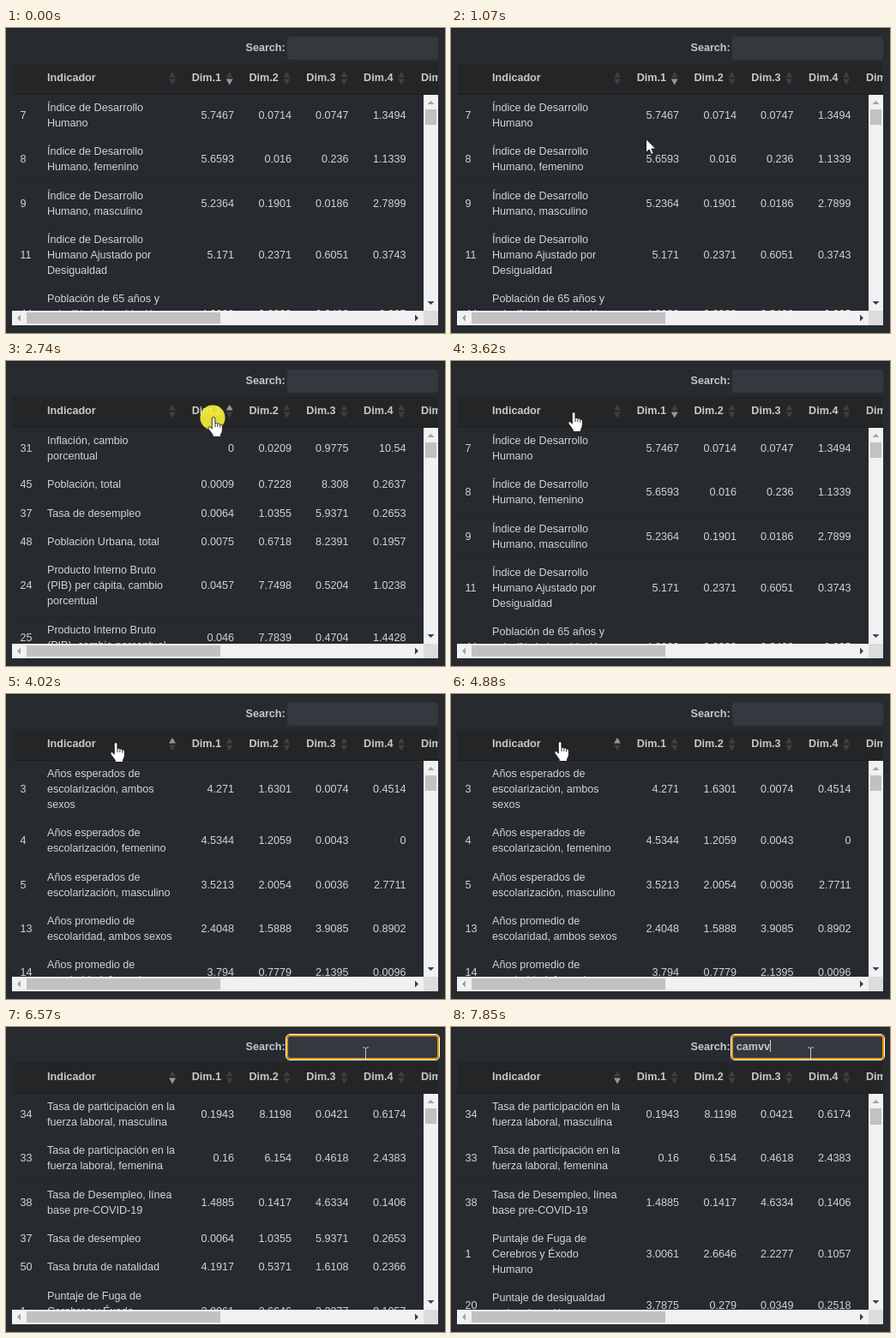
These frames come from a looping animation (512 by 356 pixels, 8 s). An HTML page:

```html
<!DOCTYPE html>
<html lang="es">
<head>
<meta charset="utf-8">
<title>Tabla de indicadores</title>
<style>
  html, body { margin: 0; width: 100%; height: 100%; overflow: hidden; background: #272b30; }
  svg { display: block; width: 512px; height: 356px; }
  text { font: 12.6px "Liberation Sans", Arial, sans-serif; fill: #d2d4d5; white-space: pre; }
  .bold { font-weight: bold; fill: #c8c8c8; }
</style>
</head>
<body>
<svg id="stage" viewBox="0 0 512 356" xmlns="http://www.w3.org/2000/svg">
  <defs>
    <clipPath id="bodyClip"><rect x="7" y="78" width="480" height="252"/></clipPath>
    <clipPath id="headClip"><rect x="7" y="41" width="497" height="37"/></clipPath>
  </defs>
  <rect width="512" height="356" fill="#272b30"/>
  <rect width="512" height="1" fill="#1f2226"/>

  <text class="bold" x="279.5" y="27">Search:</text>
  <rect x="328" y="10" width="176" height="27" rx="4" fill="#34393f"/>
  <g id="focus" fill="none">
    <rect x="326.5" y="8.5" width="179" height="30" rx="4.5" stroke="#fff"/>
    <rect x="328" y="10" width="176" height="27" rx="3.5" stroke="#e59700" stroke-width="2"/>
  </g>
  <text id="query" class="bold" x="332.7" y="27"></text>
  <rect id="caret" width="1" height="14" fill="#d8d8d8"/>

  <g clip-path="url(#headClip)">
    <rect x="7" y="41" width="497" height="37" fill="#242526"/>
    <rect x="7" y="77" width="497" height="1" fill="#1c1e20"/>
    <g id="head"></g>
  </g>
  <g id="body" clip-path="url(#bodyClip)"></g>

  <rect x="487" y="78" width="17" height="252" fill="#f1f1f1"/>
  <rect x="7" y="330" width="480" height="17" fill="#f1f1f1"/>
  <rect x="487" y="330" width="17" height="17" fill="#dcdcdc"/>
  <rect id="thumb" x="489" y="95" width="13" height="18" fill="#c1c1c1"/>
  <rect x="24" y="332" width="226" height="13" fill="#c1c1c1"/>
  <path d="M491.5 89h8l-4-4zM17 334.5v8l-4-4z" fill="#a3a3a3"/>
  <path d="M491.5 319h8l-4 4zM477 334.5v8l4-4z" fill="#34424f"/>

  <circle id="press" r="14.6" fill="#f8f23a" opacity=".9"/>
  <path id="arrow" d="M.5 .5V16.5L4.2 13L6.7 18.5L9.2 17.4L6.8 12H11.8Z"
    fill="#fff" stroke="#111" stroke-width=".9"/>
  <g id="hand">
    <path transform="translate(0 -.8) scale(1.08)" d="M-.7 13V2Q-.7 .4 1 .4T2.7 2V7Q4 6.1 5.3 7.4Q6.8 6.7 8 8.2Q10.5 7.8 10.5 10.2V14
      Q10.5 17 8.8 19V21.6H.2V19.5L-4.4 13.2Q-5.3 11.6-4 10.8Q-2.7 10.2-1.7 11.6Z
      M2.8 7V11M5.4 8V11M8 8.5V11.5" fill="#fff" stroke="#111" stroke-width=".8" stroke-linejoin="round"/>
  </g>
  <path id="beam" d="M-1 -6.5H1.5L2.5 -5.5L3.5 -6.5H6M2.5 -6V6.5M-1 7.5H1.5L2.5 6.5L3.5 7.5H6"
    fill="none" stroke="#c4c6c8"/>
</svg>
<script>
const LOOP = 8000, STEP = 67;
const $ = id => document.getElementById(id);
const rightEdges = [266, 333, 399.5, 466.5];

// id, lines of the label, four values
const row = (id, label, values) => ({ id, lines: label.split("|"), values: values.split(" ") });

const jobless = row(37, "Tasa de desempleo", "0.0064 1.0355 5.9371 0.2653");
const brain = row(1, "Puntaje de Fuga de|Cerebros y Éxodo|Humano", "3.0061 2.6646 2.2277 0.1057");
const workRates = [
  row(34, "Tasa de participación en la|fuerza laboral, masculina", "0.1943 8.1198 0.0421 0.6174"),
  row(33, "Tasa de participación en la|fuerza laboral, femenina", "0.16 6.154 0.4618 2.4383"),
  row(38, "Tasa de Desempleo, línea|base pre-COVID-19", "1.4885 0.1417 4.6334 0.1406")
];

const views = {
  dimDown: { col: 1, up: false, rows: [
    row(7, "Índice de Desarrollo|Humano", "5.7467 0.0714 0.0747 1.3494"),
    row(8, "Índice de Desarrollo|Humano, femenino", "5.6593 0.016 0.236 1.1339"),
    row(9, "Índice de Desarrollo|Humano, masculino", "5.2364 0.1901 0.0186 2.7899"),
    row(11, "Índice de Desarrollo|Humano Ajustado por|Desigualdad", "5.171 0.2371 0.6051 0.3743"),
    row(44, "Población de 65 años y|más (% de la población|total)", "4.8889 0.0008 0.2498 0.985")
  ] },
  dimUp: { col: 1, up: true, rows: [
    row(31, "Inflación, cambio|porcentual", "0 0.0209 0.9775 10.54"),
    row(45, "Población, total", "0.0009 0.7228 8.308 0.2637"),
    jobless,
    row(48, "Población Urbana, total", "0.0075 0.6718 8.2391 0.1957"),
    row(24, "Producto Interno Bruto|(PIB) per cápita, cambio|porcentual", "0.0457 7.7498 0.5204 1.0238"),
    row(25, "Producto Interno Bruto|(PIB), cambio porcentual", "0.046 7.7839 0.4704 1.4428")
  ] },
  nameUp: { col: 0, up: true, rows: [
    row(3, "Años esperados de|escolarización, ambos|sexos", "4.271 1.6301 0.0074 0.4514"),
    row(4, "Años esperados de|escolarización, femenino", "4.5344 1.2059 0.0043 0"),
    row(5, "Años esperados de|escolarización, masculino", "3.5213 2.0054 0.0036 2.7711"),
    row(13, "Años promedio de|escolaridad, ambos sexos", "2.4048 1.5888 3.9085 0.8902"),
    row(14, "Años promedio de|escolaridad, femenino", "3.794 0.7779 2.1395 0.0096")
  ] },
  nameDown: { col: 0, up: false, rows: [
    ...workRates,
    jobless,
    row(50, "Tasa bruta de natalidad", "4.1917 0.5371 1.6108 0.2366"),
    brain
  ] },
  filtered: { col: 0, up: false, rows: [
    ...workRates,
    brain,
    row(20, "Puntaje de desigualdad|en la educación", "3.7875 0.279 0.0349 0.2518")
  ] }
};

// Each list holds [start time, value]; the latest started entry applies
const viewTimes = [[0, "dimDown"], [2070, "dimUp"], [2950, "dimDown"], [4020, "nameUp"],
  [4950, "nameDown"], [7260, "filtered"]];
const queryTimes = [[0, ""], [7120, "c"], [7190, "ca"], [7260, "cam"], [7720, "camv"], [7850, "camvv"]];
const presses = [[1870, 2000], [2740, 2880], [3820, 3950], [4620, 4750], [6030, 6170]];

// Pointer moves: start time and the points visited, one per STEP
const moves = [
  [0, [[192, 338]]],
  [730, [[192, 338], [200, 282], [208, 232], [215, 190], [222, 155], [227, 129],
    [231, 112], [234, 98], [237, 86], [239, 76], [240, 70], [241, 66]]],
  [3480, [[222, 65], [178, 62], [142, 60], [130, 58], [127, 57]]],
  [4350, [[126, 56]]],
  [5350, [[138, 55], [178, 52], [228, 48], [290, 42], [345, 36], [395, 32], [417, 30.5]]]
];

const latestEntry = (list, t) => list.filter(e => e[0] <= t).pop();
const latest = (list, t) => latestEntry(list, t)[1];
const within = (t, [from, to]) => t >= from && t < to;
const show = (el, on) => el.setAttribute("visibility", on ? "visible" : "hidden");
const label = (x, y, s, extra = "") => `<text x="${x}" y="${y}" ${extra}>${s}</text>`;

function drawHead({ col, up }) {
  const names = ["Indicador", "Dim.1", "Dim.2", "Dim.3", "Dim.4", "Dim.5"];
  $("head").innerHTML = names.map((name, i) => {
    const x = i ? 216.7 + (i - 1) * 66.8 : 48;
    const mid = i ? 260.7 + (i - 1) * 66.8 : 194;
    const tint = on => i === col && on ? "#94979a" : "#3c4043";
    return label(x, 62, name, 'class="bold"') +
      `<path d="M${mid - 4} 57.5h8l-4 -6.5z" fill="${tint(up)}"/>` +
      `<path d="M${mid - 4} 59.5h8l-4 7z" fill="${tint(!up)}"/>`;
  }).join("");
}

function drawRows({ rows }) {
  let top = 76.2, out = "";
  for (const { id, lines, values } of rows) {
    const height = lines.length * 18 + 15.3;
    const mid = top + height / 2;
    const base = y => Math.round(y + 4.2);
    out += label(16.4, base(mid), id);
    lines.forEach((s, i) => out += label(48, base(mid + 18 * (i - (lines.length - 1) / 2)), s));
    values.forEach((v, i) => out += label(rightEdges[i], base(mid), v, 'text-anchor="end"'));
    top += height;
    out += `<rect x="7" y="${Math.round(top + .9)}" width="480" height="1" fill="#222529"/>`;
  }
  $("body").innerHTML = out;
}

function pointerAt(t) {
  const [start, points] = latestEntry(moves, t);
  const i = Math.floor((t - start + 5) / STEP);
  return points[Math.min(i, points.length - 1)];
}

function drawPointer(t) {
  const [x, y] = pointerAt(t);
  const inHead = y >= 41 && y < 78;
  const inBox = x >= 328 && x < 504 && y >= 10 && y < 37;
  const kind = inHead ? "hand" : inBox ? "beam" : "arrow";
  for (const id of ["arrow", "hand", "beam"]) {
    show($(id), t >= 730 && id === kind);
    $(id).setAttribute("transform", `translate(${x} ${y})`);
  }
  $("press").setAttribute("cx", x);
  $("press").setAttribute("cy", y);
  show($("press"), presses.some(p => within(t, p)));
}

let shown = "";
function render(t) {
  const name = latest(viewTimes, t);
  if (name !== shown) {
    shown = name;
    drawHead(views[name]);
    drawRows(views[name]);
    $("thumb").setAttribute("height", name === "filtered" ? 19 : 18);
  }
  const query = latest(queryTimes, t);
  const box = $("query");
  if (box.textContent !== query) box.textContent = query;
  show($("focus"), t >= 6030);
  show($("caret"), within(t, [6030, 6570]) || t >= 7120);
  $("caret").setAttribute("x", query ? Math.round(333 + box.getComputedTextLength()) : 333);
  $("caret").setAttribute("y", query ? 15 : 16);
  drawPointer(t);
}

const start = performance.now();
function tick() {
  render(Math.max(0, performance.now() - start) % LOOP);
  requestAnimationFrame(tick);
}
tick();
</script>
</body>
</html>
```
